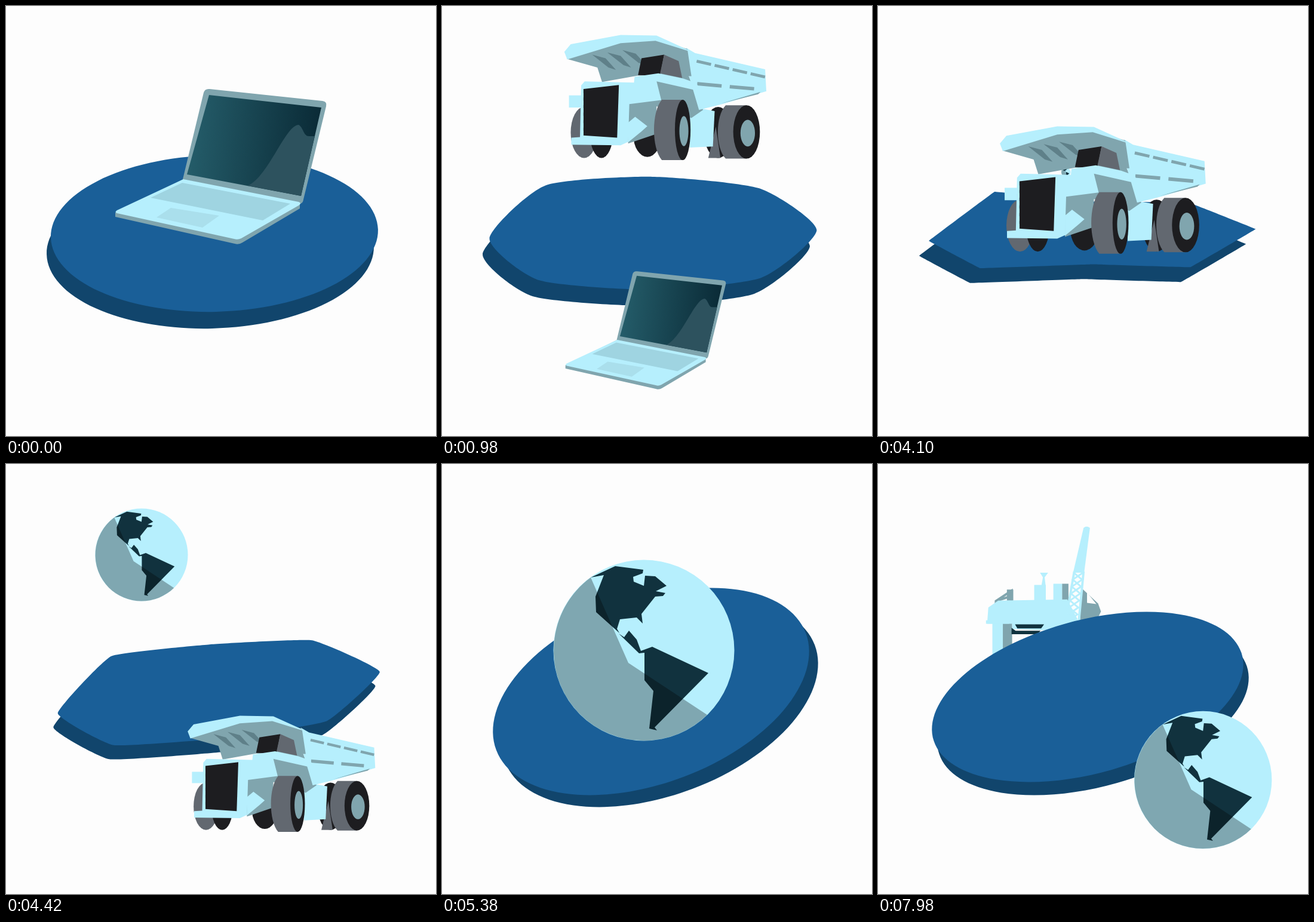
Recreate the animation shown at these times as an HTML page with a canvas. Size 720 by 720 pixels, loop 8000 ms.

```html
<!DOCTYPE html>
<html lang="en">
<head>
<meta charset="utf-8">
<title>Rotating showcase</title>
<style>
html, body { margin: 0; width: 100%; height: 100%; overflow: hidden; background: #fdfdfd; }
canvas { display: block; width: 720px; height: 720px; }
</style>
</head>
<body>
<canvas id="stage" width="720" height="720"></canvas>
<script>
const ctx = document.getElementById('stage').getContext('2d');
const LIGHT = '#b6effd', MID = '#80a5ae', RIB = '#5f8089', DARK = '#1d1d20', TYRE = '#626870', LAND = '#11323e';
const TOP = '#1a5f98', SIDE = '#11456c', PAPER = '#fdfdfd';
const LOOP = 8000, FRAME = 40, FIRST = 460, PERIOD = 3610, CHANGE = 1160;

// Path helpers
const poly = points => `M${points}Z`;
const box = (x, y, w, h) => `M${x} ${y}h${w}v${h}h${-w}Z`;
const oval = (x, y, rx, ry) => `M${x - rx} ${y}a${rx} ${ry} 0 1 1 ${2 * rx} 0a${rx} ${ry} 0 1 1 ${-2 * rx} 0Z`;
const repeat = (n, make) => Array.from({ length: n }, (_, i) => make(i)).join('');
const dashes = (n, x, y, dx, dy, length) =>
  repeat(n, i => `M${x + i * dx} ${y + i * dy}l${length * dx} ${length * dy}`);
const tread = (x, y, ry) => `M${x} ${y - ry}h-36c-18 ${ry * 0.4} -18 ${ry * 1.6} 0 ${ry * 2}h36Z`;

// A part is [colour, path, line width]; no width means filled.
const parts = list => list.map(([color, d, width]) => ({ color, path: new Path2D(d), width }));
const wheel = (x, y, rx, ry) => [
  [TYRE, tread(x, y, ry)],
  [DARK, oval(x, y, rx, ry)],
  [MID, oval(x + 2, y + 2, rx / 2 + 1, ry / 2)],
];

const glass = ctx.createLinearGradient(310, 215, 525, 235);
glass.addColorStop(0, '#245c69');
glass.addColorStop(1, '#0a2a36');

const laptop = parts([
  [MID, 'M296 290L331 145Q333 138 341 139L530 159Q538 160 536 168L498 324Q497 332 490 331Z'],
  [glass, poly('340 149 528 170 494 318 303 282')],
  ['#2d525e', 'M405 301C440 285 468 199 490 199C498 203 498 219 508 218H517L494 318Z'],
  [MID, 'M183 346V353L383 398Q390 400 396 396L492 339V328L297 290Z'],
  [LIGHT, 'M297 290L490 328Q496 330 490 334L394 389Q388 392 382 390L186 347Q181 345 186 342Z'],
  ['#9fd4e1', poly('295 296 476 331 430 359 242 321')],
  ['#aadfec', poly('276 338 357 351 329 371 252 354')],
]);

const truck = parts([
  [TYRE, oval(227, 345, 23, 44)],
  [DARK, oval(257, 345, 20, 44)],
  [DARK, oval(336, 350, 24, 37)],
  [DARK, oval(458, 345, 24, 44)],
  [TYRE, poly('454 335 462 389 441 389')],
  ...wheel(507, 344, 23, 46),
  [LIGHT, poly('409 300 452 308 449 369 409 371')],
  [MID, poly('350 255 404 240 432 306 412 320 352 300 350 348 303 364 300 296')],
  [LIGHT, poly('403 199 418 208 539 236 541 274 465 296 425 306 404 235')],
  [MID, poly('197 218 290 190 352 185 405 201 412 248 320 247 258 258 250 233')],
  [LIGHT, poly('193 206 204 193 290 177 352 178 418 208 350 187 290 191 198 219')],
  [RIB, repeat(3, i => `M${241 + i * 26} ${211 - i * 4}l23 6 18 20 -13 -4Z`)],
  [MID, dashes(4, 421, 222, 31, 7.2, 0.8), 5],
  [MID, dashes(2, 422, 261, 56, 5, 0.75), 6],
  [MID, poly('463 295 531 275 527 279')],
  [DARK, poly('326 217 365 211 358 247 320 246')],
  [TYRE, poly('365 211 390 222 396 251 358 243')],
  [LIGHT, poly('228 257 313 259 314 249 355 243 398 252 421 260 427 274 352 257 360 289 305 296 303 361 290 367 205 366 205 354 220 353 222 264')],
  [LIGHT, box(201, 281, 21, 21)],
  [LIGHT, poly('303 328 315 318 336 334 326 343 303 362')],
  [DARK, poly('226 270 287 263 284 354 226 350')],
  [LIGHT, dashes(6, 225, 277, 0, 13, 0.6), 2],
  ...wheel(397, 340.5, 13.5, 52),
]);

const globe = parts([
  [LIGHT, oval(338, 312, 151.5, 151.5)],
  [LAND, poly('249 190 290 171 337 177 336 183 320 189 321 197 338 204 340 187 357 188 376 204 358 213 374 216 370 221 357 222 334 251 336 267 326 257 298 260 293 276 297 283 258 248 257 222 271 186')],
  [LAND, poly('296 284 305 290 313 279 326 294 333 313 352 306 446 350 356 441 360 446 347 443 354 380 339 362 339 316 330 317')],
  ['#0000004d', 'M249 190L312 333 444 420A151.5 151.5 0 0 1 231 419A151.5 151.5 0 0 1 249 190Z'],
]);

const rig = parts([
  [MID, 'M195 237V229L222 211V230M195 229L222 220', 4],
  [MID, box(214, 209, 11, 19) + box(309, 199, 11, 31) + box(207, 265, 16, 65)],
  [MID, poly('342 206 371 233 376 247 372 255 340 263')],
  [PAPER, poly('352 214 368 234 352 232')],
  [LIGHT, box(189, 262, 18, 68) + box(178, 262, 40, 6) + box(261, 201, 20, 30) + box(294, 199, 15, 30)],
  [LIGHT, poly('182 240 199 228 318 226 338 265 300 280 223 277 223 268 180 268')],
  [LIGHT, poly('271 180 285 180 279 188 281 205 273 205 276 188')],
  [LAND, poly('228 269 278 269 273 276 232 276') + poly('222 275 229 280 272 280 266 286 222 286')],
  [LIGHT, 'M346 103Q351 98 357 103L347 180H328Z'],
  [LIGHT, 'M330 178L315 264M346 178L338 262', 4],
  [LIGHT, repeat(8, i => `${i ? 'L' : 'M'}${(i % 2 ? 345 : 329) - i * 1.6} ${180 + i * 12}`), 3],
  [LIGHT, repeat(8, i => `${i ? 'L' : 'M'}${(i % 2 ? 329 : 345) - i * 1.6} ${180 + i * 12}`), 3],
]);

// Eight outline points, clockwise from the left.
function ellipse(cx, cy, a, b, degrees) {
  const turn = degrees * Math.PI / 180, cos = Math.cos(turn), sin = Math.sin(turn);
  return Array.from({ length: 8 }, (_, i) => {
    const angle = Math.PI * (1 + i / 4), x = a * Math.cos(angle), y = b * Math.sin(angle);
    return [cx + x * cos - y * sin, cy + x * sin + y * cos];
  });
}

// The plate blends evenly from each shape to the next.
const plates = [
  { round: 1, depth: [-7, 28], outline: ellipse(349, 381, 274, 131, -1.4) },
  { round: 0, depth: [-17, 25], outline: [
    [85, 391], [197, 310], [360, 330], [520, 332], [633, 376], [522, 438], [357, 430], [170, 436]] },
  { round: 1, depth: [15, 20], outline: ellipse(350, 381, 277, 153, -20.7) },
  { round: 1, depth: [-8, 28], outline: ellipse(354, 416, 253, 61, -1) },
];

// Each actor rises by `lift` on its entrance and is flung by `fling` on its exit.
const actors = [
  { art: laptop, rest: [360, 268], fling: [-19, 278], shrink: 0.243 },
  { art: truck, rest: [367, 286], lift: [7, -133], grow: 6, fling: [116, 288], shrink: 0.12 },
  { art: globe, rest: [338, 312], lift: [-116, -167], grow: 2, fling: [284, 299], shrink: 0.33 },
  { art: rig, rest: [280, 250], lift: [-22, -44], grow: 12, base: [20, 40], fling: [0, 0], shrink: 0 },
];

const mix = (a, b, p) => a + (b - a) * p;
const mixPoint = (a, b, p) => a.map((v, n) => mix(v, b[n], p));
const phase = (k, t) => Math.min(1, Math.max(0, (t - FIRST - k * PERIOD) / CHANGE));

function pose(actor, i, t) {
  const { rest, lift = [0, 0], base = [0, 0], grow = 1, fling, shrink } = actor;
  const enter = i ? phase(i - 1, t) : 1, leave = phase(i, t);
  const rise = Math.sin(Math.PI * enter ** 0.75), swing = Math.sin(Math.PI * leave);
  return {
    ...actor,
    visible: enter > 0 && leave < 1,
    front: enter >= 0.5 && leave < 0.5,
    at: rest.map((v, n) => v + base[n] + lift[n] * rise + fling[n] * swing),
    scale: (1 - (1 - enter) ** grow) * (1 - shrink * swing) * Math.min(1, 2.4 * (1 - leave)),
  };
}

function drawActor({ art, rest, at, scale }) {
  ctx.save();
  ctx.translate(...at);
  ctx.scale(scale, scale);
  ctx.translate(-rest[0], -rest[1]);
  for (const { color, path, width } of art) {
    ctx.fillStyle = ctx.strokeStyle = color;
    ctx.lineWidth = width || 1;
    if (width) ctx.stroke(path);
    else ctx.fill(path);
  }
  ctx.restore();
}

function drawPlate(t) {
  const progress = phase(0, t) + phase(1, t) + phase(2, t);
  const i = Math.min(2, Math.floor(progress)), p = progress - i;
  const from = plates[i], to = plates[i + 1];
  const points = from.outline.map((point, n) => mixPoint(point, to.outline[n], p));
  const round = mix(from.round, to.round, p) * 0.1875;
  const at = n => points[(n + 8) % 8];
  const handle = (n, sign) => at(n).map((v, c) => v + sign * round * (at(n + 1)[c] - at(n - 1)[c]));
  const shape = new Path2D();
  shape.moveTo(...at(0));
  for (let n = 0; n < 8; n++) shape.bezierCurveTo(...handle(n, 1), ...handle(n + 1, -1), ...at(n + 1));
  ctx.save();
  ctx.translate(...mixPoint(from.depth, to.depth, p));
  ctx.fillStyle = SIDE;
  ctx.fill(shape);
  ctx.restore();
  ctx.fillStyle = TOP;
  ctx.fill(shape);
}

function render(time) {
  const t = Math.floor((time % LOOP - 20) / FRAME) * FRAME + 20;
  ctx.fillStyle = PAPER;
  ctx.fillRect(0, 0, 720, 720);
  const cast = actors.map((actor, i) => pose(actor, i, t)).filter(a => a.visible);
  cast.filter(a => !a.front).forEach(drawActor);
  drawPlate(t);
  cast.filter(a => a.front).forEach(drawActor);
}

const start = performance.now();
function tick() {
  render(performance.now() - start);
  requestAnimationFrame(tick);
}
tick();
</script>
</body>
</html>
```
